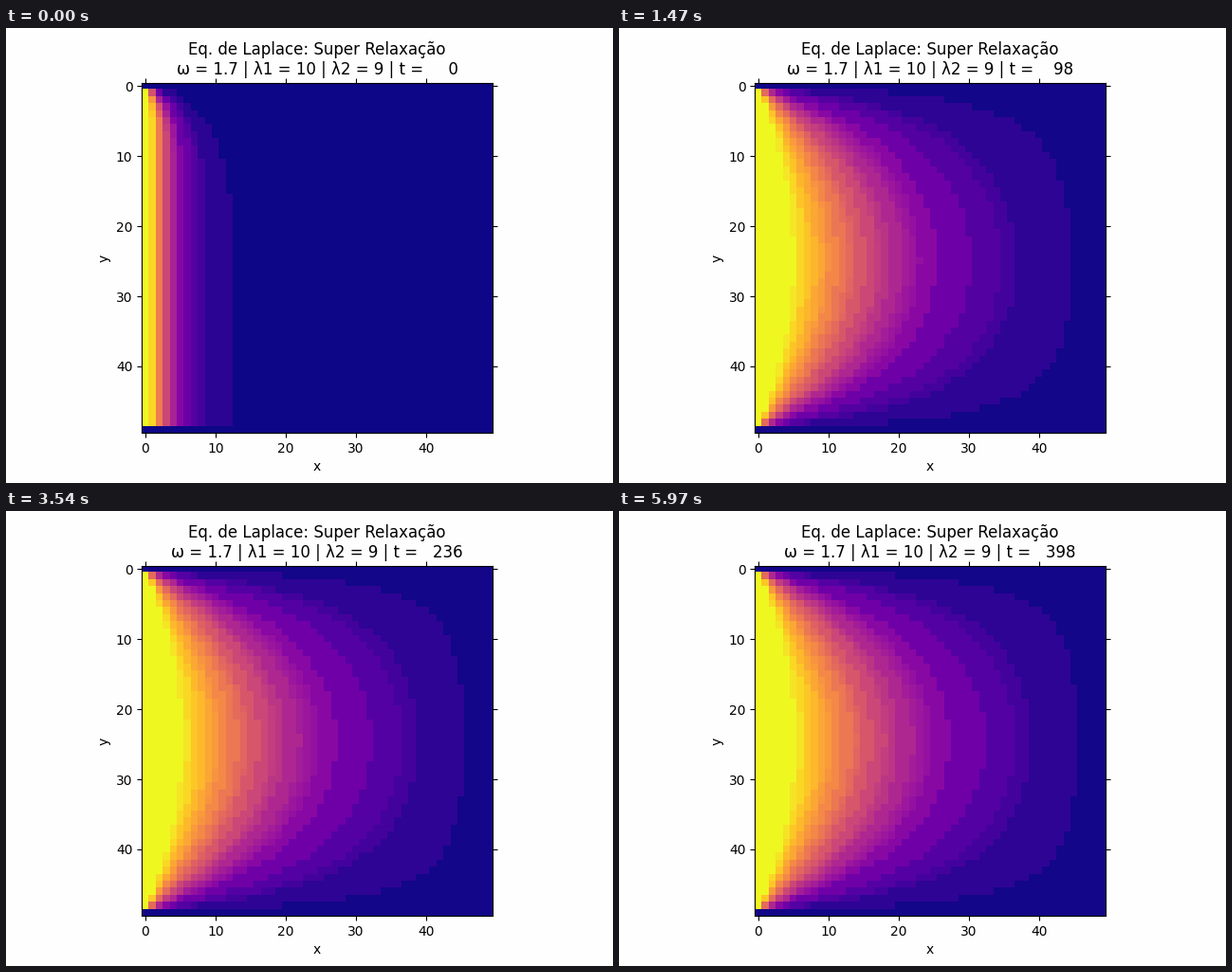
A matplotlib script that plays this animation: 640x480 px, repeating every 6000 ms.

```python
import numpy as np
import matplotlib.pyplot as plt
from matplotlib.animation import FuncAnimation

N = 50
OMEGA = 1.7
FRAMES = 200
VMAX = 0.8


def sweep(u):
    """One in-place over-relaxed Gauss-Seidel pass."""
    for i in range(1, N - 1):
        up, row, down = u[i - 1], u[i], u[i + 1]
        for j in range(1, N - 1):
            mean = (up[j] + down[j] + row[j - 1] + row[j + 1]) / 4
            row[j] += OMEGA * (mean - row[j])


def solve():
    u = [[0.0] * N for _ in range(N)]
    for row in u[1:-1]:
        row[0] = 1.0
    fields = []
    for _ in range(FRAMES):
        sweep(u)
        fields.append(np.array(u))
        sweep(u)
    return fields


def banded(field):
    """Plasma colours merged into coarse RGB buckets, each shown as its mean."""
    rgb = plt.cm.plasma(np.clip(field / VMAX, 0, 1), bytes=True)[..., :3].astype(int)
    key = (rgb[..., 0] >> 5) * 128 + (rgb[..., 1] >> 4) * 8 + (rgb[..., 2] >> 5)
    out = np.empty_like(rgb)
    for k in np.unique(key):
        cells = key == k
        out[cells] = rgb[cells].mean(axis=0)
    return out.astype(np.uint8)


pictures = [banded(f) for f in solve()]

plt.rcParams["font.family"] = "DejaVu Sans"
fig, ax = plt.subplots(figsize=(6.4, 4.8), dpi=100, facecolor="#fefefe")
image = ax.imshow(pictures[0], interpolation="nearest")
ax.set_xlabel("x")
ax.set_ylabel("y")
ax.tick_params(top=True, right=True)
title = ax.set_title("")


def draw(k):
    image.set_data(pictures[k])
    title.set_text("Eq. de Laplace: Super Relaxação\n"
                   f"ω = {OMEGA} | λ1 = 10 | λ2 = 9 | t = {2 * k:5d}")
    return image, title


anim = FuncAnimation(fig, draw, frames=FRAMES, interval=30, repeat=True, repeat_delay=0)
plt.show()
```
